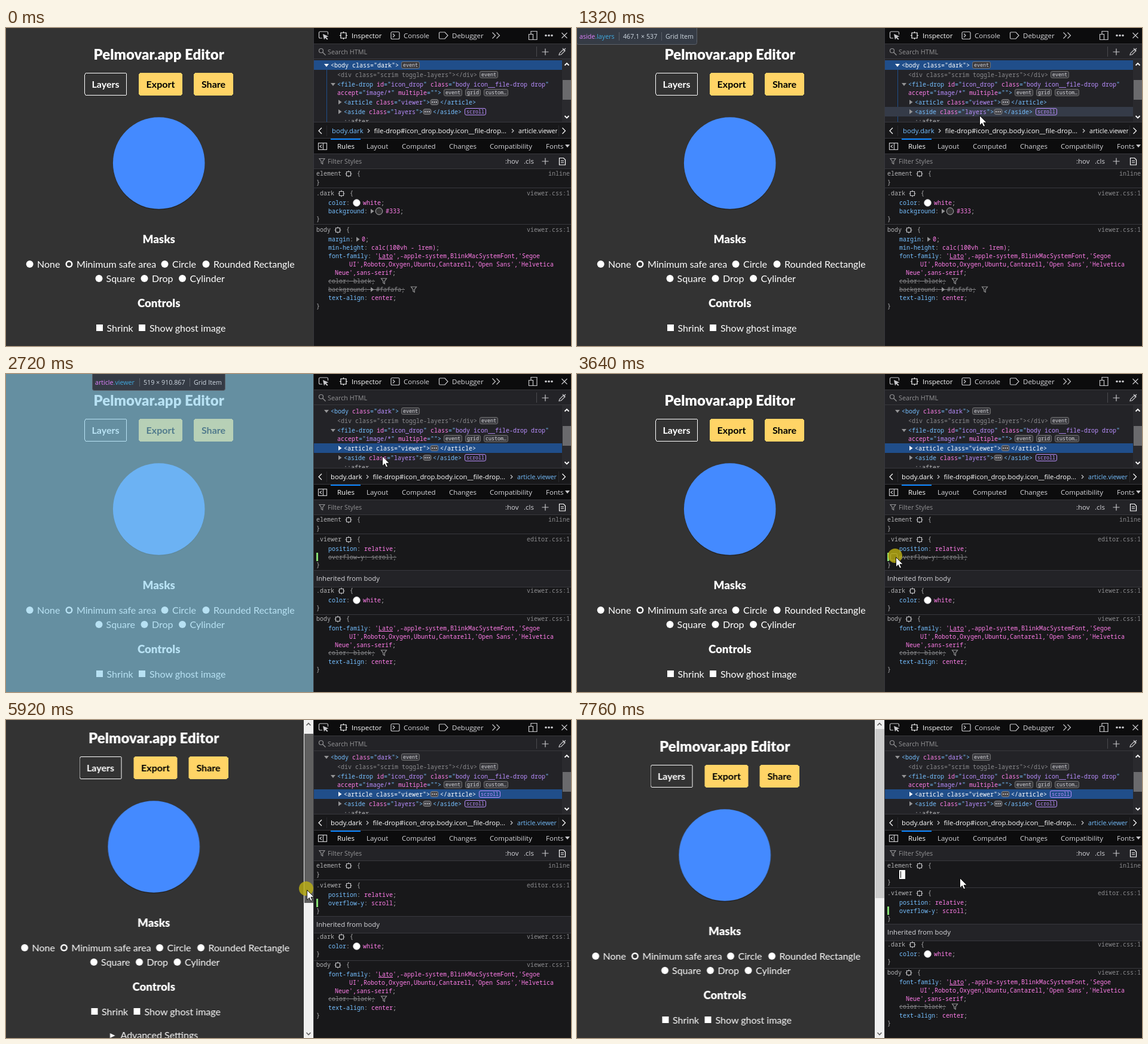
Recreate the animation shown at these times as an HTML page. Size 945 px wide and 532 px high, loop 8 s.

```html
<!DOCTYPE html>
<html lang="en">
<head>
<meta charset="utf-8">
<title>Editor with inspector</title>
<style>
html, body { margin: 0; width: 100%; height: 100%; overflow: hidden; background: #333; }
svg { display: block; width: 945px; height: 532px; }
text { white-space: pre; }
.page text { font: 16px Lato, sans-serif; fill: #fff; }
.page .h1 { font-size: 24px; font-weight: 900; text-anchor: middle; }
.page .h2 { font-size: 18.7px; font-weight: 900; text-anchor: middle; }
.page .btn { font-weight: 700; text-anchor: middle; }
.page .ink { fill: #000; }
.page rect { shape-rendering: crispEdges; }
.m { font: 10px "Noto Sans Mono", monospace; fill: #b1b1b3; }
.u { font: 11.5px "Open Sans", sans-serif; fill: #d7d7db; }
.u.crumb { font-size: 11.3px; }
.u.crumb.short { font-size: 10.7px; }
.u.field { font-size: 10.8px; fill: #939395; }
.u.tip { font-size: 10.7px; fill: #d0d9e2; }
.m.badge { font-size: 8.4px; fill: #d7d7db; text-anchor: middle; }
.end { text-anchor: end; }
.u.w { fill: #fff; }
.tag, .u.tag { fill: #75bfff; }
.dim, .dim .n, .dim .v { fill: #8a8a8d; }
.n { fill: #ff7de9; }
.v { fill: #b98eff; }
.sel, .sel .n, .sel .v { fill: #fff; }
.p { fill: #75bfff; }
.q { fill: #ff7de9; }
.off, .off .p, .off .q { fill: #87878a; }
.i { fill: none; stroke: #c8c8cb; stroke-width: 1.2; }
.i.hi { stroke: #fff; }
.i.lo { stroke: #939395; }
.i.bold { stroke-width: 1.8; }
.i.bar { stroke: #606060; stroke-width: 1.6; }

.page { animation: page 8s step-end infinite; }
.thumb { animation: thumb 8s step-end infinite, tint 8s step-end infinite; }
.mouse { animation: mouse 8s step-end infinite; }
.lower { animation: lower 8s step-end infinite; }

@keyframes page {
  0% { transform: none; }
  47.5% { transform: translate(-8.5px, 0); }
  66% { transform: translate(-8.5px, 0); animation-timing-function: steps(4); }
  70% { transform: translate(-8.5px, -45px); animation-timing-function: steps(4); }
  74% { transform: translate(-8.5px, -14px); }
  75%, 100% { transform: translate(-8.5px, 0); }
}
@keyframes thumb {
  0% { transform: translateY(0); }
  66% { transform: translateY(0); animation-timing-function: steps(4); }
  70% { transform: translateY(26px); animation-timing-function: steps(4); }
  74% { transform: translateY(8px); }
  75%, 100% { transform: translateY(0); }
}
@keyframes tint {
  0% { fill: #cdcdcd; }
  65% { fill: #a6a6a6; }
  67% { fill: #606060; }
  77.5% { fill: #a6a6a6; }
  80.5%, 100% { fill: #cdcdcd; }
}
@keyframes lower {
  0% { transform: none; }
  97%, 100% { transform: translateY(13px); }
}
@keyframes mouse {
  0% { transform: translate(933px, 512px); }
  11.5% { transform: translate(933px, 512px); animation-timing-function: steps(3); }
  14.5% { transform: translate(735px, 232px); animation-timing-function: steps(2); }
  16.5% { transform: translate(672px, 144px); animation-timing-function: steps(2); }
  18.5% { transform: translate(655px, 138px); }
  21% { transform: translate(655px, 138px); animation-timing-function: steps(5); }
  26% { transform: translate(639px, 124px); }
  34% { transform: translate(628px, 135px); animation-timing-function: steps(8); }
  42% { transform: translate(532px, 304px); }
  57.5% { transform: translate(532px, 304px); animation-timing-function: steps(5); }
  63% { transform: translate(493px, 281px); animation-timing-function: steps(2); }
  65% { transform: translate(501px, 274px); }
  66% { transform: translate(502px, 274px); animation-timing-function: steps(4); }
  70% { transform: translate(502px, 300px); animation-timing-function: steps(4); }
  74% { transform: translate(502px, 282px); animation-timing-function: steps(3); }
  76.5% { transform: translate(502px, 235px); }
  77.5% { transform: translate(502px, 252px); }
  78.5% { transform: translate(502px, 252px); animation-timing-function: steps(5); }
  83.5% { transform: translate(585px, 181px); }
  86.5% { transform: translate(590px, 181px); animation-timing-function: steps(4); }
  90%, 100% { transform: translate(639px, 262px); }
}
</style>
</head>
<body>
<svg id="stage" viewBox="0 0 945 532"></svg>
<script>
let css = '', count = 0;

// Shows a group between pairs of loop percentages.
const show = (html, ...toggles) => {
  const name = 'show' + count++;
  const keys = toggles.map((t, i) => `${t}%{opacity:${1 - i % 2}}`).join('');
  css += `@keyframes ${name}{0%{opacity:0}${keys}}\n`;
  return `<g style="animation:${name} 8s step-end infinite">${html}</g>`;
};

const text = (cls, x, y, s) => `<text class="${cls}" x="${x}" y="${y}">${s}</text>`;
const rect = (x, y, w, h, fill, more = '') =>
  `<rect x="${x}" y="${y}" width="${w}" height="${h}" fill="${fill}" ${more}/>`;
const disc = (x, y, r, fill, more = '') => `<circle cx="${x}" cy="${y}" r="${r}" fill="${fill}" ${more}/>`;
const icon = (d, cls = '') => `<path class="i ${cls}" d="${d}"/>`;
const shape = (d, fill) => `<path d="${d}" fill="${fill}"/>`;
const right = (x, y, fill = '#939395') => shape(`M${x} ${y - 4}l5.5 4-5.5 4z`, fill);
const down = (x, y, fill = '#939395') => shape(`M${x} ${y - 2.5}h8l-4 5z`, fill);
const rule = y => rect(515, y, 430, 1, '#38383d');
const target = (x, y, r, cls) => icon(
  `M${x - r} ${y - r}h${2 * r}v${2 * r}h${-2 * r}z` +
  `M${x} ${y - r}v-2M${x} ${y + r}v2M${x - r} ${y}h-2M${x + r} ${y}h2`, cls);
const funnel = (x, y) => icon(`M${x - 4.5} ${y - 4.5}h9l-3.3 4.5v4.5l-2.4-1.5v-3z`, 'lo');

// Left page
const mid = 255.7;
const radio = (x, y, label, tx) => disc(x, y, 6, '#fff') + text('', tx, y + 6, label);
const check = (x, label, tx) => rect(x, 496, 11, 11, '#fff') + text('', tx, 508, label);
const page = `<g class="page">
  ${text('h1', mid, 53, 'Pelmovar.app Editor')}
  ${rect(131.9, 75.5, 70, 37, 'none', 'rx="3" stroke="#fff"')}
  ${rect(221.9, 75, 73, 38, '#ffd466', 'rx="4"')}
  ${rect(313.9, 75, 66, 38, '#ffd466', 'rx="4"')}
  ${text('btn', 166.5, 100, 'Layers')}${text('btn ink', 258.5, 100, 'Export')}${text('btn ink', 347, 100, 'Share')}
  ${disc(mid, 227.5, 76.8, '#000', 'opacity=".3"')}${disc(mid, 226, 76.8, '#448aff')}
  ${text('h2', mid, 360, 'Masks')}
  ${radio(39.7, 395, 'None', 52)}${radio(105.5, 395, 'Minimum safe area', 118)}${disc(105.5, 395, 3.5, '#333')}
  ${radio(265.5, 395, 'Circle', 278)}${radio(334.5, 395, 'Rounded Rectangle', 347)}
  ${radio(155.5, 419, 'Square', 167.5)}${radio(231.5, 419, 'Drop', 244)}${radio(295, 419, 'Cylinder', 307.5)}
  ${text('h2', mid, 467, 'Controls')}
  ${check(150.9, 'Shrink', 168.5)}${check(221.9, 'Show ghost image', 240)}
  ${shape('M182.500 538l8.500 4-8.500 4z', '#fff')}${text('', 200, 547, 'Advanced Settings')}
</g>`;

const scrollbar = show(rect(498, 0, 16, 532, '#f0f0f0') +
  rect(499, 15, 15, 283, '#cdcdcd', 'class="thumb"') +
  icon('M502.500 9l3.500-3.500 3.500 3.500M502.500 523l3.500 3.500 3.500-3.500', 'bar'), 47.5);

const tip = (x, w, tag, cls, size, sx, kind = '') =>
  rect(x - .5, -4.5, w, 32, '#353b45', 'rx="3" stroke="#5b6069"') +
  text('tip u', x + 4, 18, `<tspan fill="#df80ff">${tag}</tspan><tspan fill="#40abe2">.${cls}</tspan>`) +
  rect(sx, 7, 1, 14, '#5b6069') + text('tip u', sx + 7, 18, size) +
  (kind && rect(x + w - 60, 7, 1, 14, '#5b6069') + text('tip u', x + w - 53, 18, kind));

const highlight = show(rect(0, 0, 514, 532, '#87ceeb', 'opacity=".6"'), 25, 35, 83.5, 87.5) +
  show(tip(0, 201, 'aside', 'layers', '467.1 × 537', 70, 'Grid Item'), 16.5, 25) +
  show(tip(145, 222, 'article', 'viewer', '519 × 910.867', 223, 'Grid Item'), 25, 35) +
  show(tip(193, 126, 'body', 'dark', '519 × 537', 256), 83.5, 87.5);

// Tool bars
const bars = rect(514, 0, 431, 532, '#18181a') + rect(514, 0, 1, 532, '#38383d') +
  rect(515, 0, 430, 26, '#0c0c0d') + rule(26) +
  icon('M529 17h-3.500a2 2 0 0 1-2-2v-7a2 2 0 0 1 2-2h11a2 2 0 0 1 2 2v3') +
  shape('M530 10l9.500 4-4 1.200 3 3.300-1.500 1.300-3-3.300-2 3z', '#c8c8cb') +
  target(564.5, 12.5, 4.5, 'hi') + text('u w', 578, 17, 'Inspector') +
  rect(644, 6.5, 14, 12, 'none', 'rx="2" class="i"') + icon('M647 9.500l3 3-3 3') + text('u', 665, 17, 'Console') +
  icon('M726 7h8l5 5.500-5 5.500h-8a1.500 1.500 0 0 1-1.500-1.500v-8a1.500 1.500 0 0 1 1.500-1.500z') + text('u', 746, 17, 'Debugger') +
  icon('M813.500 7.500l5 5-5 5M820.500 7.500l5 5-5 5') +
  icon('M878 10v-4.500h10v14h-6M874.500 10.500h7v9h-7z') +
  [903, 908, 913].map(x => disc(x, 12.5, 1.8, '#c8c8cb')).join('') +
  icon('M929.500 8l9 9M938.500 8l-9 9') +
  rect(515, 27, 430, 24, '#232327') + rule(51) +
  disc(527, 38, 3.5, 'none', 'class="i lo"') + icon('M529.500 40.500l5 5', 'lo') + text('u field', 538, 44, 'Search HTML') +
  rect(887, 31, 1, 17, '#4a4a4f') + icon('M896.500 40h11M902 34.500v11') +
  icon('M925 45l1-3 6-6 2.500 2.500-6 6zM931 34l4.500 4.500M933.500 36.500l2.500-2.500');

// Markup tree
const esc = s => s.replace(/</g, '&lt;').replace(/>/g, '&gt;');
const row = (x, y, s, cls = 'tag') => text('m ' + cls, x, y, esc(s).replace(/([\w-]+)="([^"]*)"/g,
  '<tspan class="n">$1</tspan>="<tspan class="v">$2</tspan>"'));
const badge = (x, y, w, s, hue) =>
  rect(x + .5, y - 9.5, w - 1, 11, hue ? 'none' : '#38383d', `rx="2.5" stroke="${hue || '#737373'}"`) +
  text('m badge', x + w / 2, y - 1, hue ? `<tspan fill="${hue}">${s}</tspan>` : s);
const dots = (x, y) => rect(x + 1, y - 8.5, 13, 9, '#4a4a4f', 'rx="3" stroke="#939395" stroke-width=".8"') +
  [4, 7.5, 11].map(d => disc(x + d, y - 4, 1, '#d7d7db')).join('');
const band = (y, fill) => rect(515, y, 415, 16, fill);
const node = (y, tag, cls, dx, ex, style) => row(565, y, `<${tag} class="${cls}">`, style) +
  dots(dx, y) + row(ex, y, `</${tag}>`, style);
const bodyRow = style => row(543, 66, '<body class="dark">', style);
const article = style => node(128, 'article', 'viewer', 709, 726, style);

const tree = rect(515, 52, 430, 106, '#232327') +
  show(band(54, '#204e8a') + rect(536, 70, 1, 87, '#204e8a') + down(532, 62.5, '#fff') + bodyRow('sel'), 0, 30) +
  show(down(532, 62.5) + bodyRow(), 30) +
  badge(661, 66, 31, 'event') +
  row(554, 82, '<div class="scrim toggle-layers"></div>', 'dim') + badge(792, 82, 31, 'event') +
  down(543, 94.5) + row(554, 98, '<file-drop id="icon_drop" class="body icon__file-drop drop"') +
  row(554, 112, 'accept="image/*" multiple="">') +
  badge(732, 112, 31, 'event') + badge(768, 112, 26, 'grid') + badge(799, 112, 41, 'custom…') +
  show(band(116, '#353b48'), 24, 30) + show(right(556, 124) + article(), 0, 30) +
  show(band(116, '#204e8a') + right(556, 124, '#fff') + article('sel'), 30) +
  show(badge(791, 128, 36, 'scroll', '#b98eff'), 49.5) +
  show(band(132, '#353b48'), 16.5, 24) + right(556, 140) +
  node(144, 'aside', 'layers', 697, 714) + badge(767, 144, 36, 'scroll', '#b98eff') +
  text('m', 565, 160, '::after') +
  rect(930, 52, 15, 106, '#2a2a2e') + rect(931, 87, 14, 33, '#6a6a6d') +
  icon('M934.500 62.500l3.500-3.500 3.500 3.500M934.500 147l3.500 3.500 3.500-3.500', 'hi bold');

// Breadcrumbs and tabs
const crumbs = (x, first, last) => `<g clip-path="url(#crumbs)">` +
  text('u crumb ' + first, x, 176, 'body.dark') + icon(`M${x + 60} 169l3 3-3 3`) +
  text('u crumb w', x + 70.5, 176, 'file-drop#icon_drop.body.icon__file-drop...') +
  icon(`M${x + 301} 169l3 3-3 3`) + text('u crumb short ' + last, x + 312, 176, 'article.viewer') + '</g>';
const tabs = [['Rules', 554], ['Layout', 603], ['Computed', 662], ['Changes', 741], ['Compatibility', 809], ['Fonts', 903]];
const nav = rect(515, 157, 430, 27, '#18181a') + rule(157) +
  icon('M528 167l-5 5 5 5M930.500 167l5 5-5 5', 'hi') +
  rect(536, 163, 1, 18, '#2a2a2e') + rect(924, 163, 1, 18, '#2a2a2e') +
  show(crumbs(545, 'tag', 'w'), 0, 32) + show(crumbs(543, 'w', 'tag'), 32) +
  rect(515, 184, 430, 26, '#0c0c0d') + rule(184) + rect(543, 185, 50, 2, '#0a84ff') +
  rect(522.5, 192.5, 14, 11, 'none', 'class="i"') + icon('M530.500 193v10M528 195.500l-3 2.500 3 2.500') +
  tabs.map(([s, x], i) => text(i ? 'u' : 'u w', x, 202, s)).join('') +
  rect(933, 186, 12, 23, '#0c0c0d') + down(935, 197.5, '#c8c8cb') + rule(210) +
  rect(515, 211, 430, 24, '#232327') + rule(235) +
  funnel(528.5, 223) + text('u field', 538, 227, 'Filter Styles') +
  text('u', 835, 227, ':hov') + text('u', 866, 227, '.cls') +
  icon('M896.500 223h11M902 217.500v11') +
  icon('M925.500 217.500h7l3 3v8.500h-10zM928 222h5M928 225h5', 'hi');

// Style rules
const head = (y, name, src) => {
  const x = 519 + 6 * name.length;
  return text('m', 519, y, name) + target(x + 12, y - 3, 3.5) + text('m', x + 26, y, '{') +
    text('m end dim', 943, y, src);
};
const close = y => text('m', 519, y, '}');
const decl = (y, prop, value, vx = 551 + 6 * prop.length, cls = '') =>
  text('m ' + cls, 539, y, `<tspan class="p">${prop}</tspan>:`) +
  text('m ' + cls, vx, y, `<tspan class="q">${value}</tspan>;`);
const struck = (y, prop, value, vx, w) => decl(y, prop, value, vx, 'off') + rect(539, y - 4, w, 1, '#87878a');
const swatch = (x, y, fill) => disc(x, y, 5.8, fill, 'stroke="#d7d7db" stroke-width=".8"');
const white = y => decl(y, 'color', 'white', 597) + swatch(586.5, y - 3.5, '#fff');
const fonts = y => text('m', 539, y, '<tspan class="p">font-family</tspan>: <tspan class="q">\'<tspan text-decoration="underline">Lato</tspan>' +
  "',-apple-system,BlinkMacSystemFont,'Segoe</tspan>") +
  text('m q', 574, y + 14, "UI',Roboto,Oxygen,Ubuntu,Cantarell,'Open Sans','Helvetica") +
  text('m', 550, y + 28, '<tspan class="q">Neue\',sans-serif</tspan>;');
const black = y => struck(y, 'color', 'black', undefined, 78) + funnel(632, y - 3.5);

const darkBody = close(262) + rule(267) +
  head(280, '.dark', 'viewer.css:1') + white(296) +
  decl(310, 'background', '#333', 635) + right(610, 306.5) + swatch(624, 306.5, '#333') + close(323) + rule(328) +
  head(341, 'body', 'viewer.css:1') + decl(357, 'margin', '0', 595) + right(586, 353.5) +
  decl(371, 'min-height', 'calc(100vh - 1rem)') + fonts(385) + black(427) +
  struck(441, 'background', '#fafafa', 619, 128) + right(610, 437.5) + funnel(682, 437.5) +
  decl(455, 'text-align', 'center') + close(469);

const tick = rect(524.5, 300.5, 11, 11, '#18181a', 'rx="2" stroke="#b1b1b3"');
const viewer = `<g class="lower">` + close(262) + rule(267) +
  head(280, '.viewer', 'editor.css:1') + decl(296, 'position', 'relative') +
  show(struck(310, 'overflow-y', 'scroll', undefined, 114), 30, 47.5) +
  show(decl(310, 'overflow-y', 'scroll'), 47.5) +
  rect(519, 299, 3, 14, '#86de74') +
  show(tick, 41, 67) + show(icon('M527 306l2.500 2.500 4-5', 'hi bold'), 47.5, 67) +
  close(323) + rect(515, 328, 430, 28, '#232327') + rule(328) + rule(356) +
  text('u crumb', 519, 346, 'Inherited from body') +
  head(366, '.dark', 'viewer.css:1') + white(382) + close(395) + rule(402) +
  head(413, 'body', 'viewer.css:1') + fonts(429) + black(470) +
  decl(485, 'text-align', 'center') + close(498) + '</g>';

const rules = head(247, 'element', 'inline') + show(darkBody, 0, 30) + show(viewer, 30) +
  show(rect(539, 251, 10, 15, '#fff') + rect(541, 253, 1, 11, '#000'), 97);

// Pointer
const arrow = '<path transform="translate(1 2)" d="M.5.5v16.5l3.800-3.700 2.500 5.700 2.700-1.200-2.500-5.500h5.200z" ' +
  'fill="#fff" stroke="#000" stroke-width=".9"/>';
const beam = '<path d="M-.5-6.500h2.500l.5.8.5-.8h2.500M-.5 9.500h2.500l.5-.8.5.8h2.500M2.500-6v15" fill="none" stroke="#fff"/>';
const mouse = `<g class="mouse">` +
  show(disc(0, 0, 12, '#bdb012', 'opacity=".8"'), 29, 30, 45.5, 47.5, 67, 77.5, 95, 97) +
  show(arrow, 11.5, 90, 97) + show(beam, 92, 97) + '</g>';

document.getElementById('stage').innerHTML =
  '<clipPath id="crumbs"><rect x="538" y="160" width="384" height="22"/></clipPath>' +
  page + scrollbar + highlight + bars + tree + nav + rules + mouse;
document.head.appendChild(document.createElement('style')).textContent = css;
</script>
</body>
</html>
```
